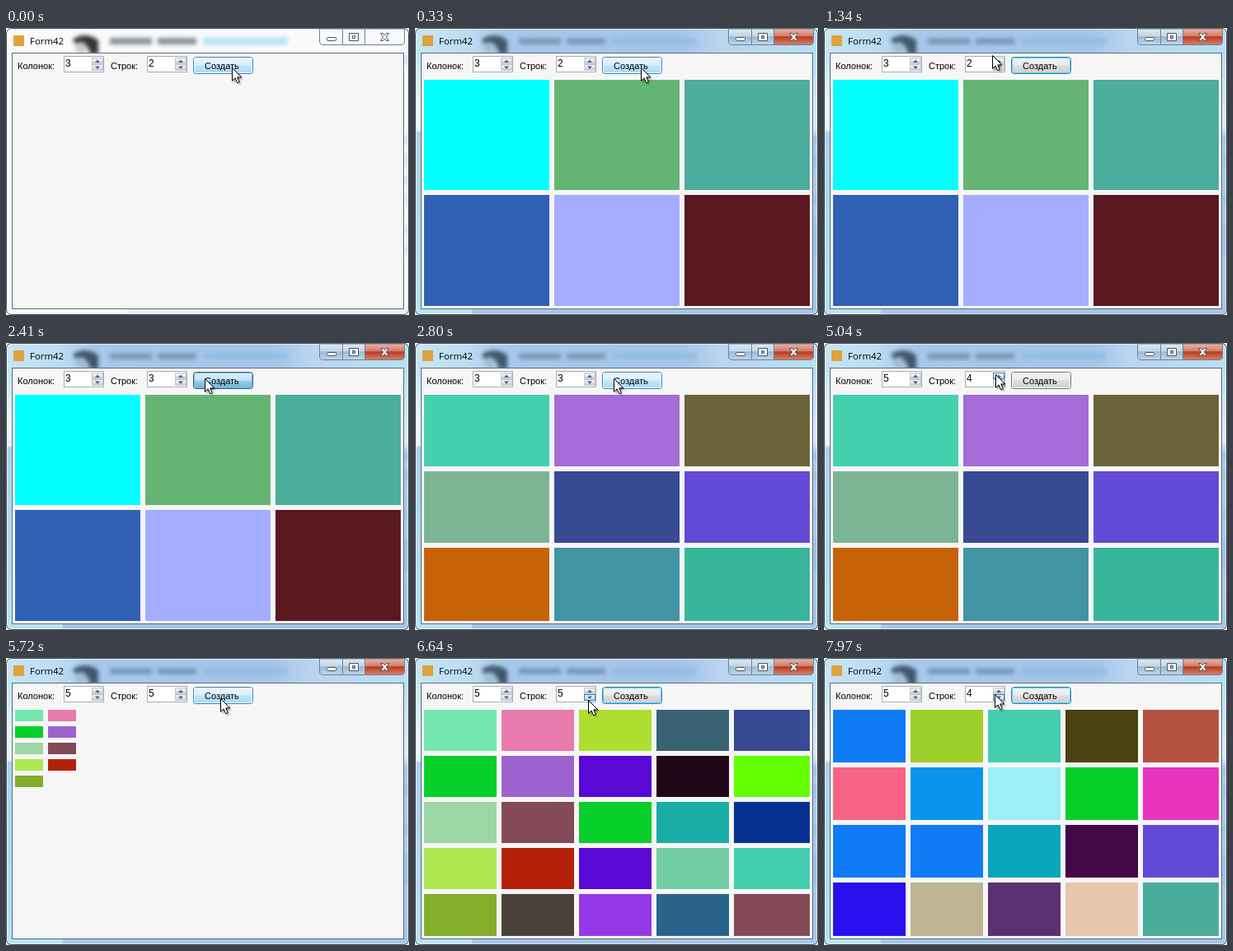
These frames come from a looping animation (489 px wide and 349 px high, 8000 ms). An HTML page:

```html
<!DOCTYPE html>
<html lang="ru">
<head>
<meta charset="utf-8">
<title>Form42</title>
<style>
  html, body { margin: 0; width: 100%; height: 100%; overflow: hidden; background: #fff; }
  svg { display: block; }
  text { font: 11px "Liberation Sans", Arial, sans-serif; fill: #000; }
  .title { font: 11.4px "Open Sans", "Noto Sans", sans-serif; }
  .value { font-size: 12px; }
  .blur { filter: blur(2.5px); }
</style>
</head>
<body>
<svg id="stage" width="489" height="349" viewBox="0 0 489 349">
  <defs>
    <linearGradient id="glassTop">
      <stop offset="0" stop-color="#c4e6f6"/><stop offset=".13" stop-color="#bcdcf3"/>
      <stop offset=".22" stop-color="#a6c8ea"/><stop offset=".66" stop-color="#a4c5e8"/>
      <stop offset=".76" stop-color="#b9d5f0"/><stop offset="1" stop-color="#b5e0f4"/>
    </linearGradient>
    <linearGradient id="glassLeft" x2="0" y2="1">
      <stop offset="0" stop-color="#bfe5f5"/><stop offset=".2" stop-color="#e6f5fb"/>
      <stop offset=".3" stop-color="#e6f5fb"/><stop offset=".31" stop-color="#a9d2ef"/>
      <stop offset="1" stop-color="#b4e2f3"/>
    </linearGradient>
    <linearGradient id="glassRight" x2="0" y2="1">
      <stop offset="0" stop-color="#b5e0f4"/><stop offset=".28" stop-color="#dcebf8"/>
      <stop offset=".34" stop-color="#adcdee"/><stop offset="1" stop-color="#a3c6ec"/>
    </linearGradient>
    <linearGradient id="captionActive" x2="0" y2="1">
      <stop offset="0" stop-color="#dcebf7"/><stop offset=".45" stop-color="#c1d6e9"/>
      <stop offset=".5" stop-color="#9db9d3"/><stop offset="1" stop-color="#bcd7ec"/>
    </linearGradient>
    <linearGradient id="closeActive" x2="0" y2="1">
      <stop offset="0" stop-color="#e9b5a8"/><stop offset=".45" stop-color="#d37c69"/>
      <stop offset=".5" stop-color="#bb3a22"/><stop offset="1" stop-color="#d68367"/>
    </linearGradient>
    <linearGradient id="normal" x2="0" y2="1">
      <stop offset="0" stop-color="#f2f2f2"/><stop offset=".48" stop-color="#ebebeb"/>
      <stop offset=".52" stop-color="#dddddd"/><stop offset="1" stop-color="#cfcfcf"/>
    </linearGradient>
    <linearGradient id="hover" x2="0" y2="1">
      <stop offset="0" stop-color="#eaf6fd"/><stop offset=".48" stop-color="#d9f0fc"/>
      <stop offset=".52" stop-color="#bee6fd"/><stop offset="1" stop-color="#a7d9f5"/>
    </linearGradient>
    <linearGradient id="pressed" x2="0" y2="1">
      <stop offset="0" stop-color="#dceff9"/><stop offset=".48" stop-color="#c4e5f6"/>
      <stop offset=".52" stop-color="#98d1ef"/><stop offset="1" stop-color="#68b3db"/>
    </linearGradient>
    <clipPath id="windowShape"><rect width="489" height="349" rx="6"/></clipPath>
  </defs>

  <g clip-path="url(#windowShape)">
    <g id="idle">
      <rect width="489" height="349" fill="#fafafa"/>
      <path d="M147 342H489V349H147Z" fill="#efefef"/>
      <g class="blur">
        <path d="M82 13Q98 4 112 15V32H101Q104 19 82 18Z" fill="#333"/>
        <circle cx="91" cy="24" r="7" fill="#c3ccd0"/>
        <path d="M126 16H177M184 16H231" stroke="#6b7680" stroke-width="8" opacity=".8"/>
        <path d="M239 16H342" stroke="#b5e3f6" stroke-width="9"/>
        <path d="M487 32V45M487 130V142M487 154V168M487 180V192M487 203V214M487 239V251M487 264V276"
              stroke="#b9e4f6" stroke-width="6"/>
      </g>
    </g>
    <g id="active">
      <rect width="489" height="349" fill="#a3c6ec"/>
      <rect width="489" height="31" fill="url(#glassTop)"/>
      <rect y="28" width="8" height="321" fill="url(#glassLeft)"/>
      <rect x="482" y="28" width="7" height="321" fill="url(#glassRight)"/>
      <rect y="341" width="69" height="8" fill="#b8e4f4"/>
      <g class="blur">
        <path d="M82 13Q98 4 112 15V32H101Q104 19 82 18Z" fill="#41566a"/>
        <circle cx="91" cy="24" r="7" fill="#a0bed2"/>
        <path d="M126 16H177M184 16H231" stroke="#62809f" stroke-width="7" opacity=".7"/>
        <path d="M239 16H342" stroke="#93bce2" stroke-width="8"/>
        <path d="M487 130V142M487 154V168M487 203V214M487 239V276" stroke="#8fb6de" stroke-width="4"/>
      </g>
    </g>
  </g>
  <rect x="1.5" y="1.5" width="486" height="346" rx="5" fill="none" stroke="#fff" opacity=".65"/>
  <rect x=".5" y=".5" width="488" height="348" rx="6" fill="none" stroke="#4a5158"/>

  <rect x="9" y="9" width="13" height="13" fill="#dfa23c"/>
  <text class="title" x="29" y="20">Form42</text>

  <g id="caption" stroke="#73818f">
    <path d="M380.5 1V16Q380.5 20.5 385 20.5H435.5V1Z"/>
    <path id="close" d="M435.5 1V20.5H479Q483.5 20.5 483.5 16V1Z"/>
    <path d="M408.5 1V20" fill="none"/>
  </g>
  <g fill="#fff" stroke="#4d535c">
    <rect x="389.5" y="11.5" width="11" height="4" rx="1"/>
    <path fill-rule="evenodd" d="M416.5 6.5H427.5V15.5H416.5ZM420.5 9.5V12.5H423.5V9.5Z"/>
    <path d="M454.5 6.5H457.5L459.5 8.8L461.5 6.5H464.5L461.3 11L464.5 15.5H461.5L459.5 13.2L457.5 15.5H454.5L457.7 11Z"/>
  </g>

  <rect x="7.5" y="30.5" width="475" height="311" fill="#f6f6f6" stroke="#5d6b78"/>
  <text x="14" y="50">Колонок:</text>
  <text x="127" y="50">Строк:</text>
  <g id="spinners"></g>
  <path id="caret" d="M72.5 37V50" stroke="#000"/>
  <rect id="button" x="227.5" y="35.5" width="72" height="20" rx="3"/>
  <rect id="buttonRim" x="228.5" y="36.5" width="70" height="18" rx="2" fill="none"/>
  <text x="241" y="50">Создать</text>
  <g id="cells" shape-rendering="crispEdges"></g>

  <g id="cursor">
    <path d="M2 3V19L6 15.5L9 21L11 20L8.5 14.5H14Z" fill="#000" opacity=".35" style="filter:blur(1.2px)"/>
    <path d="M.5 .5V16.2L4.1 12.9L6.7 18.8L9.3 17.7L6.8 11.9H11.8Z" fill="#fff" stroke="#000"/>
  </g>
</svg>

<script>
const LOOP = 8000;
const $ = id => document.getElementById(id);

// Each scene: start time, columns, rows, colours row by row.
const scenes = [
  [0, 1, 1, ''],
  [330, 3, 2, '00ffff 64b574 4bad9b 3161b5 a5adff 5a1820'],
  [2540, 3, 3, '44cfae a56bd6 6b6339 7bb594 394a94 634ad6 c66308 4294a5 39b59c'],
  [5720, 5, 5, `75e7ae e77bad adde31 396373 394a94 08cf29 9c63ce 5a08d6 210818 63ff00
    9cd6a5 844a5a 08cf29 18ada5 083194 ade752 b52108 5a08d6 73cea5 44cfae
    84ad29 4a4239 9439e7 29638c 844a5a`],
  [7250, 5, 4, `107bf7 9ccf29 44cfae 4a4210 b55242 f76384 0894ef 9ceff7 08cf29 e735bd
    107bf7 107bf7 08a5bd 420848 634ad6 2910ef bdb594 5a3173 e7c6ad 4aad9c`],
].map(([start, cols, rows, colors]) =>
  ({ start, cols, rows, colors: colors.split(/\s+/).filter(Boolean) }));

const columnValues = [[0, 3], [3540, 4], [3990, 5]];
const rowValues = [[0, 2], [1780, 3], [4800, 4], [5060, 5], [6770, 4]];
const pressedSpans = [[130, 330], [2400, 2540], [5660, 5720], [7180, 7250]];
const focusSpans = [[0, 1780], [2400, 3540], [5660, 6770], [7180, LOOP]];

// Cursor path: time, x, y.
const path = [
  [0, 274, 48], [920, 274, 48], [1120, 238, 42], [1340, 204, 33], [1650, 207, 36],
  [2110, 207, 36], [2360, 241, 43], [2800, 241, 43], [3080, 165, 31], [3340, 110, 39],
  [4050, 110, 39], [4250, 122, 45], [4500, 170, 29], [4740, 208, 38],
  [5130, 208, 38], [5530, 260, 49], [6040, 260, 49], [6300, 232, 62], [6600, 210, 51],
  [6900, 210, 51], [7110, 236, 49], [7270, 236, 49], [7520, 209, 54],
  [7780, 209, 53], [7970, 207, 44], [LOOP, 207, 44],
];

const latest = (steps, t) => steps.findLast(([start]) => start <= t)[1];
const within = (spans, t) => spans.some(([a, b]) => t >= a && t < b);
const inside = ([px, py], x, y, w, h) => px >= x && px < x + w && py >= y && py < y + h;

function cursorAt(t) {
  const i = path.findIndex(([time]) => time > t);
  const [t0, x0, y0] = path[i - 1], [t1, x1, y1] = path[i];
  const k = (t - t0) / (t1 - t0);
  return [Math.round(x0 + (x1 - x0) * k), Math.round(y0 + (y1 - y0) * k)];
}

function spinner(x, value, cursor) {
  const arrowButton = (y, points) => {
    const hot = inside(cursor, x + 34, y, 15, 8);
    return `<rect x="${x + 34.5}" y="${y + .5}" width="13" height="7"
      fill="url(#${hot ? 'hover' : 'normal'})" stroke="${hot ? '#3c7fb1' : '#c3c7cc'}"/>
      <path d="${points}" fill="#4a65a8"/>`;
  };
  return `<rect x="${x + .5}" y="34.5" width="48" height="19" fill="#fff" stroke="#abadb3"/>
    <text class="value" x="${x + 2}" y="47">${value}</text>
    ${arrowButton(36, `M${x + 38} 42L${x + 41} 38.5L${x + 44} 42Z`)}
    ${arrowButton(44, `M${x + 38} 46.5L${x + 41} 50L${x + 44} 46.5Z`)}`;
}

const rect = (x, y, w, h, color) =>
  `<rect x="${x}" y="${y}" width="${w}" height="${h}" fill="#${color}"/>`;

function grid({ cols, rows, colors }) {
  const w = Math.floor(474 / cols), h = Math.floor(281 / rows);
  return colors.map((color, i) => {
    const c = i % cols, r = Math.floor(i / cols);
    const right = c === cols - 1 ? 482 : 8 + (c + 1) * w;
    const bottom = r === rows - 1 ? 341 : 60 + (r + 1) * h;
    const x = 11 + c * w, y = 63 + r * h;
    return rect(x, y, right - 3 - x, bottom - 3 - y, color);
  }).join('');
}

// The grid fills column by column with small cells before it is laid out.
function partialGrid({ cols, rows, colors }) {
  return Array.from({ length: 9 }, (_, i) => {
    const c = Math.floor(i / rows), r = i % rows;
    return rect(11 + c * 40, 63 + r * 20, 34, 14, colors[r * cols + c]);
  }).join('');
}

function setMarkup(node, markup) {
  if (node.markup !== markup) node.innerHTML = node.markup = markup;
}

function drawButton(t, cursor) {
  const pressed = within(pressedSpans, t);
  const hot = inside(cursor, 227, 35, 73, 21);
  const focused = within(focusSpans, t);
  const state = pressed ? 'pressed' : hot ? 'hover' : 'normal';
  $('button').setAttribute('fill', `url(#${state})`);
  $('button').setAttribute('stroke', pressed ? '#2c628b' : hot || focused ? '#3c7fb1' : '#707070');
  $('buttonRim').setAttribute('stroke', pressed ? '#82b4d0' : focused && !hot ? '#48d8fb' : '#fafcfd');
}

function drawWindow(active) {
  $('idle').style.display = active ? 'none' : '';
  $('active').style.display = active ? '' : 'none';
  $('caption').setAttribute('fill', active ? 'url(#captionActive)' : '#f8f9fa');
  $('close').setAttribute('fill', active ? 'url(#closeActive)' : '#f8f9fa');
}

function draw(t) {
  const cursor = cursorAt(t);
  const scene = scenes.findLast(({ start }) => start <= t);
  drawWindow(t >= 130);
  drawButton(t, cursor);
  setMarkup($('spinners'),
    spinner(70, latest(columnValues, t), cursor) + spinner(171, latest(rowValues, t), cursor));
  setMarkup($('cells'), t >= 5720 && t < 5780 ? partialGrid(scene) : grid(scene));
  $('caret').style.display = t >= 3540 && t < 4800 ? '' : 'none';
  $('cursor').setAttribute('transform', `translate(${cursor})`);
}

const begin = performance.now();
function tick() {
  draw((performance.now() - begin) % LOOP);
  requestAnimationFrame(tick);
}
tick();
</script>
</body>
</html>
```
